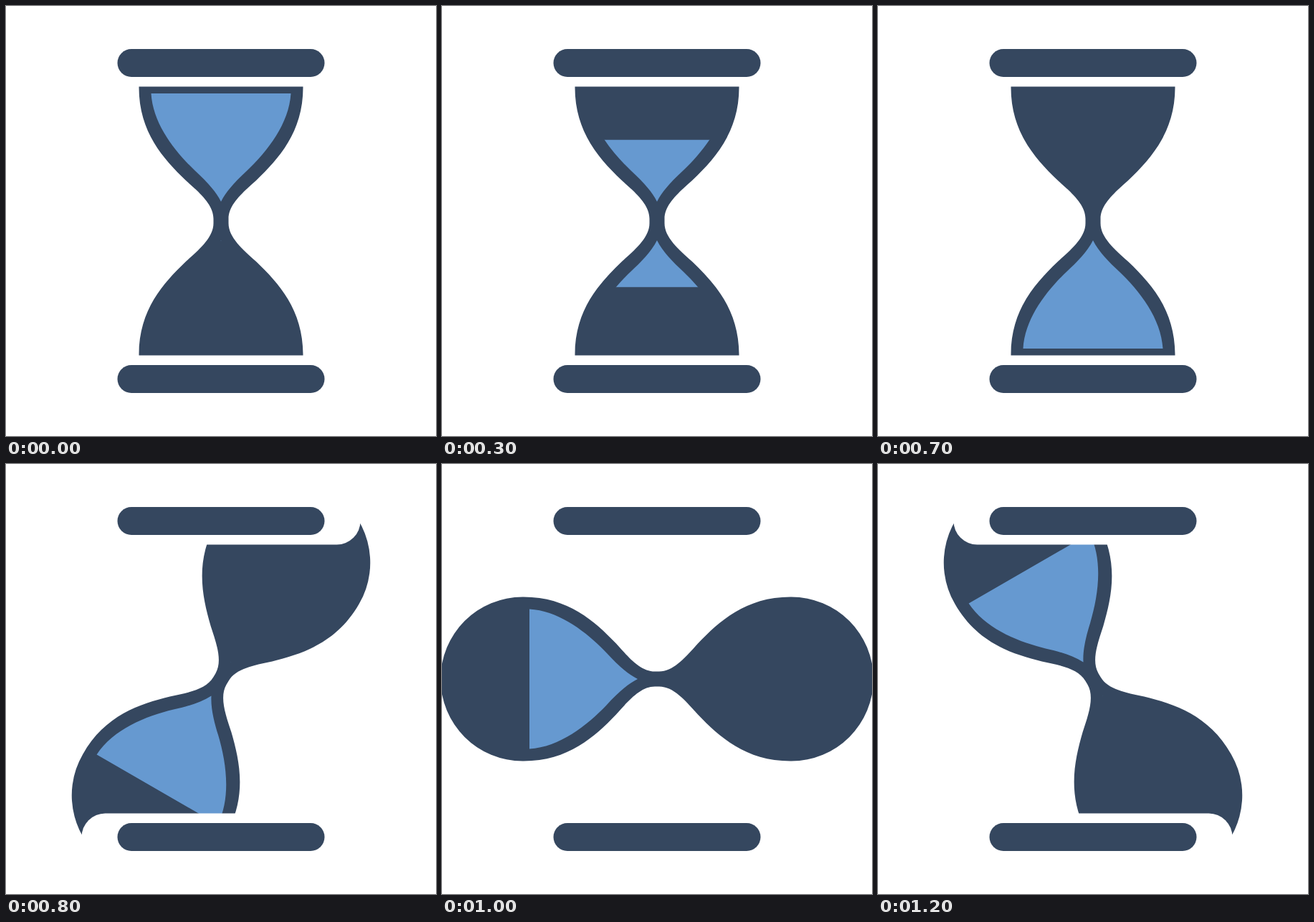
Animation of 600 by 600 pixels, one loop 1.3 s. Source, as an HTML page:

```html
<!DOCTYPE html>
<html lang="en">
<head>
<meta charset="utf-8">
<title>Hourglass</title>
<style>
  html, body { margin: 0; height: 100%; overflow: hidden; background: #fff; }
  svg { display: block; width: 100vw; height: 100vh; }
  .dark { fill: #35475f; }
  .sand { fill: #6699d0; }
  .cover { fill: #fff; }
</style>
</head>
<body>
<svg viewBox="0 0 600 600">
  <defs>
    <!-- a window sliding down empties the top bulb and fills the bottom one -->
    <clipPath id="level"><rect id="window" x="150" y="122" width="300" height="205.5"/></clipPath>
    <path id="grains" d="M202.5 122C205 164 235 202.5 264 230C277 242 292 257 300 273
      C308 257 323 242 336 230C365 202.5 395 164 397.5 122Z"/>
    <g id="end">
      <rect class="cover" x="105.5" y="-60" width="389" height="172.5" rx="33"/>
      <rect class="dark" x="155.5" y="60" width="289" height="39" rx="19.5"/>
    </g>
  </defs>
  <g id="glass">
    <path class="dark" d="M185.5 112.5C185 175.5 219.5 213.2 250.5 243C270 260.5 289.5 277 289.5 297V303
      C289.5 323 270 339.5 250.5 357C219.5 386.8 185 424.5 185.5 487.5A114.5 114.5 0 0 0 414.5 487.5
      C415 424.5 380.5 386.8 349.5 357C330 339.5 310.5 323 310.5 303V297
      C310.5 277 330 260.5 349.5 243C380.5 213.2 415 175.5 414.5 112.5A114.5 114.5 0 0 0 185.5 112.5Z"/>
    <g class="sand" clip-path="url(#level)">
      <use href="#grains"/>
      <use href="#grains" transform="rotate(180 300 300)"/>
    </g>
  </g>
  <use href="#end"/>
  <use href="#end" transform="rotate(180 300 300)"/>
</svg>
<script>
  const STEP = 100, POUR = 7, TURN = 6;
  const glass = document.getElementById('glass');
  const slider = document.getElementById('window');

  function draw() {
    const step = Math.floor(performance.now() / STEP) % (POUR + TURN);
    const poured = Math.min(step / POUR, 1);
    const angle = Math.max(step - POUR, 0) * 180 / TURN;
    slider.setAttribute('y', 122 + 151 * poured);
    glass.setAttribute('transform', `rotate(${angle} 300 300)`);
    requestAnimationFrame(draw);
  }
  draw();
</script>
</body>
</html>
```
